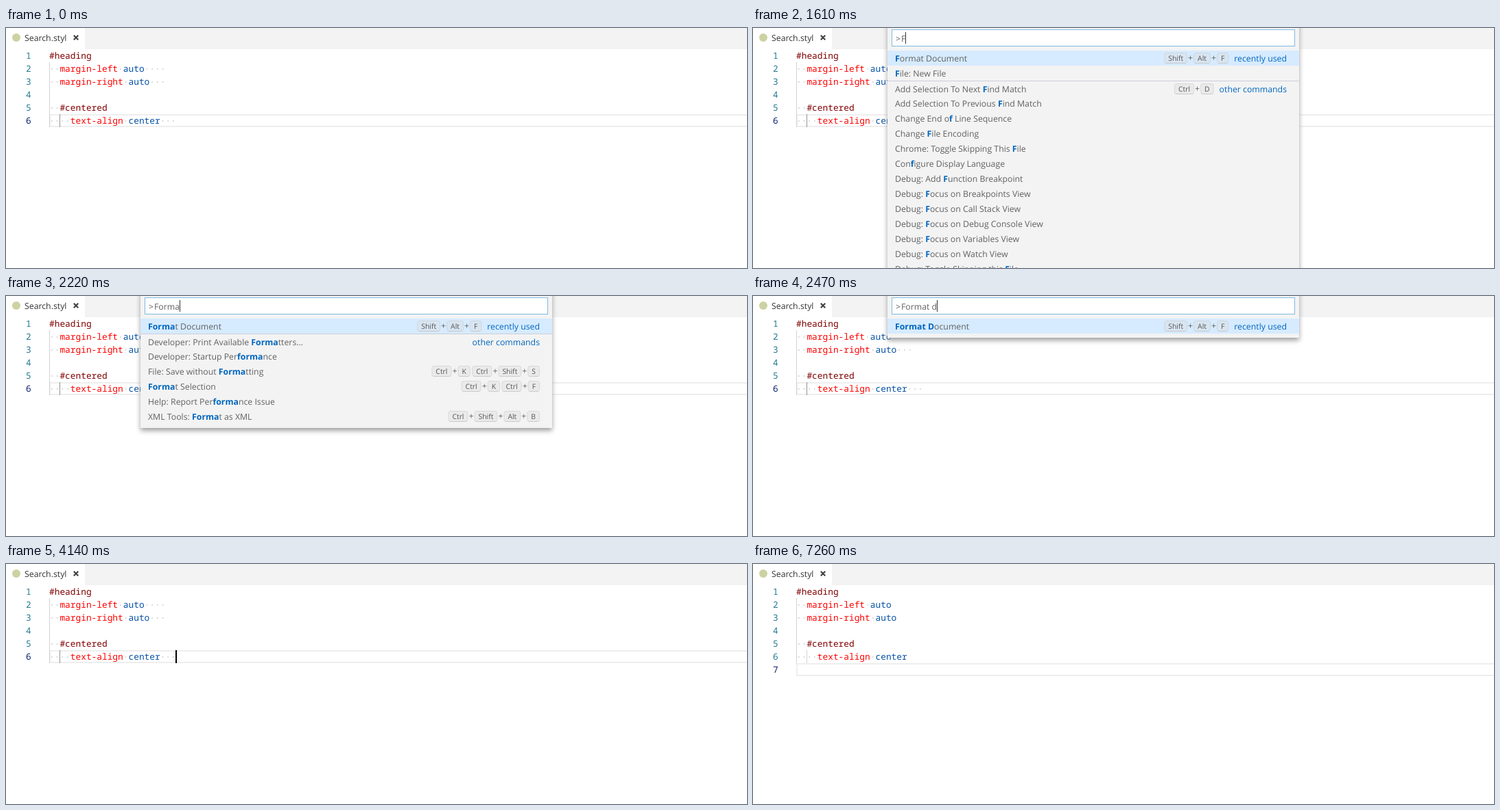
Write an HTML page with a canvas that moves like this. It is 1080 px wide and 351 px high and loops after 7.41 s.

```html
<!DOCTYPE html>
<html lang="en">
<head>
<meta charset="utf-8">
<title>Format document</title>
<style>
html, body { margin: 0; width: 100%; height: 100%; overflow: hidden; background: #fff; }
canvas { display: block; }
</style>
</head>
<body>
<canvas id="stage" width="1080" height="351"></canvas>
<script>
const ctx = document.getElementById('stage').getContext('2d');
const LOOP = 7410;
const UI = '12.3px "Open Sans", sans-serif';
const UI_BOLD = 'bold ' + UI;
const KEY = '10.4px "Open Sans", sans-serif';
const CODE = '12.83px "Noto Sans Mono", monospace';
const CHAR = 7.7, LINE = 19, CODE_X = 63, CODE_Y = 31, ROW = 22, LIST_Y = 33;
const SELECTOR = '#800000', PROPERTY = '#ff0000', VALUE = '#0451a5';

// [indent, trailing spaces before formatting, [text, colour]...]
const lines = [
  [0, 0, ['#heading', SELECTOR]],
  [2, 4, ['margin-left', PROPERTY], ['auto', VALUE]],
  [2, 3, ['margin-right', PROPERTY], ['auto', VALUE]],
  [0, 0],
  [2, 0, ['#centered', SELECTOR]],
  [4, 3, ['text-align', PROPERTY], ['center', VALUE]]
];

const recent = ['Format Document|Shift+Alt+F', 'File: New File'];
const others = [
  'Add Cursor Above|Ctrl+Alt+UpArrow',
  'Add Cursor Below|Ctrl+Alt+DownArrow',
  'Add Cursors to Line Ends|Shift+Alt+I',
  'Add Line Comment|Ctrl+K Ctrl+C',
  'Add Selection To Next Find Match|Ctrl+D',
  'Add Selection To Previous Find Match',
  'Change All Occurrences|Ctrl+F2',
  'Change End of Line Sequence',
  'Change File Encoding',
  'Change Language Mode|Ctrl+K M',
  'Chrome: Toggle Skipping This File',
  'Clear Command History',
  'Clear Editor History',
  'Close Window|Ctrl+Shift+W',
  'Configure Display Language',
  'Debug: Add Function Breakpoint',
  'Debug: Focus on Breakpoints View',
  'Debug: Focus on Call Stack View',
  'Debug: Focus on Debug Console View',
  'Debug: Focus on Variables View',
  'Debug: Focus on Watch View',
  'Debug: Toggle Skipping this File',
  'Developer: Print Available Formatters...',
  'Developer: Startup Performance',
  'Extensions: Check for Extension Updates',
  'Extensions: Search for Extensions',
  'File: Open Folder...|Ctrl+K Ctrl+O',
  'File: Save without Formatting|Ctrl+K Ctrl+Shift+S',
  'Fold All|Ctrl+K Ctrl+0',
  'Fold All Block Comments|Ctrl+K Ctrl+/',
  'Format Selection|Ctrl+K Ctrl+F',
  'Go Forward|Alt+RightArrow',
  'Help: Report Performance Issue',
  'Help: Search for Commands',
  'Search: Search for Text',
  'Transform to Lowercase',
  'Transform to Uppercase',
  'XML Tools: Format as XML|Ctrl+Shift+Alt+B'
];

const typing = [
  [1070, ''], [1610, 'F'], [1760, 'Fo'], [1840, 'For'], [1990, 'Form'],
  [2160, 'Forma'], [2230, 'Format'], [2300, 'Format '], [2470, 'Format d'],
  [2530, 'Format do'], [2700, 'Format docu'], [2930, 'Format docum'],
  [3000, 'Format docume'], [3080, 'Format documen'], [3150, 'Format document']
];
// Times at which the editor caret turns on and off.
const carets = [[290, 840], [4140, 4680], [5150, 5690], [6160, 6710], [7180, 7260]];

const between = (t, [from, to]) => t >= from && t < to;

function rect(x, y, w, h, color) {
  ctx.fillStyle = color;
  ctx.fillRect(x, y, w, h);
}

function disc(x, y, r, color) {
  ctx.fillStyle = color;
  ctx.beginPath();
  ctx.arc(x, y, r, 0, 7);
  ctx.fill();
}

// Draws text and returns its right edge.
function text(str, x, y, font, color) {
  ctx.font = font;
  ctx.fillStyle = color;
  ctx.fillText(str, x, y);
  return x + ctx.measureText(str).width;
}

function width(str, font) {
  ctx.font = font;
  return ctx.measureText(str).width;
}

function drawTab(modified) {
  rect(115, 0, 965, 31, '#f3f3f3');
  disc(15, 14, 6, '#cdd2a2');
  text('Search.styl', 27, 19, UI, '#333333');
  if (modified) {
    disc(102, 14, 4, '#424242');
    return;
  }
  ctx.strokeStyle = '#424242';
  ctx.lineWidth = 2.2;
  ctx.beginPath();
  ctx.moveTo(98.8, 10.8);
  ctx.lineTo(105.2, 17.2);
  ctx.moveTo(105.2, 10.8);
  ctx.lineTo(98.8, 17.2);
  ctx.stroke();
}

function drawDots(col, count, y) {
  for (let i = 0; i < count; i++) disc(CODE_X + (col + i + 0.5) * CHAR, y + 10, 0.95, '#cfcfcf');
}

function drawEditor(t, formatted) {
  const current = formatted ? 6 : 5;
  const top = CODE_Y + current * LINE;
  ctx.strokeStyle = '#eeeeee';
  ctx.lineWidth = 2;
  ctx.strokeRect(CODE_X + 1, top + 1, 1040, LINE - 2);

  rect(CODE_X, CODE_Y + LINE, 1, 5 * LINE, '#d3d3d3');
  rect(78, CODE_Y + 5 * LINE, 1, LINE, formatted ? '#d3d3d3' : '#939393');

  for (let n = 0; n <= current; n++) {
    text(String(n + 1), 29, CODE_Y + n * LINE + 14, CODE, n === current ? '#0b216f' : '#237893');
  }
  lines.forEach(([indent, trailing, ...words], n) => {
    const y = CODE_Y + n * LINE;
    let col = indent;
    drawDots(0, indent, y);
    words.forEach(([word, color], i) => {
      if (i) drawDots(col++, 1, y);
      text(word, CODE_X + col * CHAR, y + 14, CODE, color);
      col += word.length;
    });
    if (!formatted) drawDots(col, trailing, y);
  });

  if (carets.some(span => between(t, span))) {
    rect(formatted ? CODE_X : 247, top, 2, LINE, '#000000');
  }
}

function drawKey(label, right, cy) {
  const w = width(label, KEY) + 12;
  const x = right - w;
  ctx.beginPath();
  ctx.roundRect(x + 0.5, cy - 7.5, w - 1, 15, 3);
  ctx.fillStyle = 'rgba(221,221,221,0.4)';
  ctx.fill();
  ctx.strokeStyle = 'rgba(204,204,204,0.6)';
  ctx.lineWidth = 1;
  ctx.stroke();
  rect(x + 2, cy + 7, w - 4, 1, 'rgba(187,187,187,0.5)');
  text(label, x + 6, cy + 4, KEY, '#555555');
  return x;
}

// Lays out a shortcut from its right edge to the left.
function drawKeys(shortcut, right, cy) {
  for (const chord of shortcut.split(' ').reverse()) {
    chord.split('+').reverse().forEach((key, i) => {
      if (i) {
        text('+', right - 8, cy + 4, UI, '#616161');
        right -= 9;
      }
      right = drawKey(key, right, cy);
    });
    right -= 2.5;
  }
}

function drawRow(item, index, query, group, divided) {
  const y = LIST_Y + index * ROW;
  const cy = y + 11 + (divided ? 1 : 0);
  const [label, keys] = item.split('|');
  if (index === 0) rect(196, y, 600, ROW, '#d6ebff');
  if (divided) rect(196, y, 600, 1, '#cccedb');

  const at = label.toLowerCase().indexOf(query);
  const end = at + query.length;
  let x = text(label.slice(0, at), 207, cy + 5, UI, '#616161');
  x = text(label.slice(at, end), x, cy + 5, UI_BOLD, '#0066bf');
  text(label.slice(end), x, cy + 5, UI, '#616161');

  let right = 778;
  if (group) {
    right -= width(group, UI);
    text(group, right, cy + 5, UI, '#0066bf');
    right -= 8;
  }
  if (keys) drawKeys(keys, right, cy);
}

function drawPalette(t) {
  const typed = typing.filter(([start]) => t >= start).pop()[1];
  const query = typed.trim().toLowerCase();
  const matches = item => item.split('|')[0].toLowerCase().includes(query);
  const first = recent.filter(matches);
  const listed = t < 1150 ? [] : [...first, ...others.filter(matches)];
  const bottom = LIST_Y + listed.length * ROW + 6;

  ctx.save();
  ctx.shadowColor = '#a0a0a0';
  ctx.shadowBlur = 7;
  ctx.shadowOffsetY = 4;
  rect(196, -20, 600, bottom + 20, '#f3f3f3');
  ctx.restore();

  rect(202, 2, 588, 25, '#ffffff');
  ctx.strokeStyle = '#7fbbe0';
  ctx.lineWidth = 1;
  ctx.strokeRect(202.5, 2.5, 587, 24);
  text('>', 208, 20, UI, '#616161');
  const end = text(typed, 216, 20, UI, '#616161');
  if (t < 3700) rect(Math.round(end), 6, 1, 17, '#333333');

  listed.slice(0, 15).forEach((item, i) => {
    const divided = i === first.length;
    const group = i === 0 ? 'recently used' : divided ? 'other commands' : '';
    drawRow(item, i, query, group, divided);
  });
}

function draw(t) {
  rect(0, 0, 1080, 351, '#ffffff');
  ctx.textRendering = 'geometricPrecision';
  drawTab(between(t, [4220, 5860]));
  drawEditor(t, t >= 4220);
  if (between(t, [1070, 4140])) drawPalette(t);
}

const start = performance.now();
function tick() {
  draw((performance.now() - start) % LOOP);
  requestAnimationFrame(tick);
}
tick();
</script>
</body>
</html>
```
